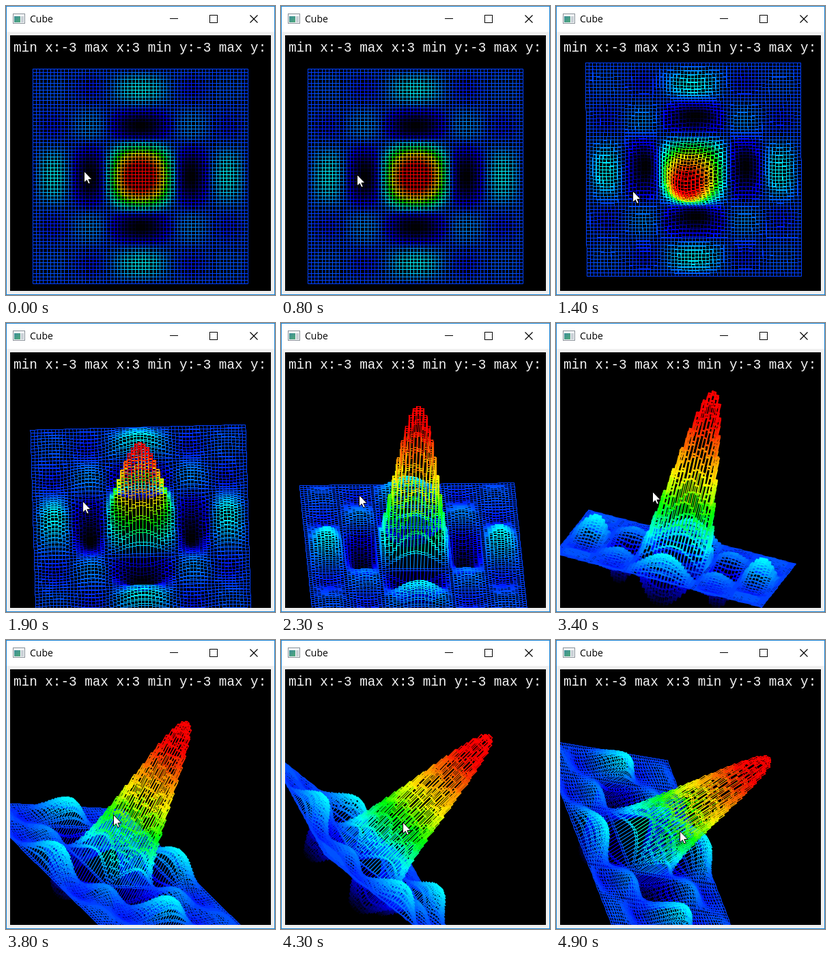
These frames come from a looping animation (394 px wide and 424 px high, 5 s). An HTML page with a canvas:

```html
<!DOCTYPE html>
<html lang="en">
<head>
<meta charset="utf-8">
<title>Cube</title>
<style>
  html, body { margin: 0; width: 100%; height: 100%; overflow: hidden; background: #f0f0f0; }
  .window { position: absolute; left: 0; top: 0; width: 394px; height: 424px; overflow: hidden; background: #f0f0f0; }
  .bar { position: absolute; left: 0; top: 0; width: 394px; height: 38px; background: #fff; }
  .border { position: absolute; inset: 0; border: 1px solid #1883d7; }
  .title { position: absolute; left: 35px; top: 9px; font: 14px/20px "Open Sans", "Noto Sans", sans-serif; color: #000; }
  svg { position: absolute; left: 0; top: 0; }
  canvas { position: absolute; left: 6px; top: 43px; background: #000; }
  .label { position: absolute; left: 11px; top: 51px; white-space: pre; color: #f4f4f4;
    font: 19.3px/22px "Liberation Mono", "DejaVu Sans Mono", monospace; }
</style>
</head>
<body>
<div class="window">
  <div class="bar"></div>
  <svg width="394" height="38">
    <defs>
      <linearGradient id="teal" x2="1" y2="1">
        <stop offset="0" stop-color="#3f8f9a"/><stop offset="1" stop-color="#4fa878"/>
      </linearGradient>
    </defs>
    <rect x="10.5" y="11.5" width="17" height="14" fill="#f4f6f8" stroke="#8a9299"/>
    <rect x="12" y="15" width="9" height="9" fill="url(#teal)"/>
    <rect x="22" y="15" width="4" height="9" fill="#c9d0d6"/>
    <g fill="none" stroke="#000">
      <path d="M240 18.5h12"/>
      <rect x="298.5" y="13.5" width="11" height="11"/>
      <path d="M357.5 13.5l11 11m0-11l-11 11" stroke-width="1.15"/>
    </g>
  </svg>
  <div class="title">Cube</div>
  <canvas id="view" width="382" height="375"></canvas>
  <div class="label">min x:-3 max x:3 min y:-3 max y:</div>
  <div class="border"></div>
</div>
<script>
const ctx = document.getElementById('view').getContext('2d');
const CELLS = 61, HALF = 157.5, CX = 197, CY = 250, ZMIN = -0.2172;
const BINS = 98;

const sinc = v => Math.abs(v) < 1e-9 ? 1 : Math.sin(Math.PI * v) / (Math.PI * v);
const dot = (a, b) => a[0] * b[0] + a[1] * b[1] + a[2] * b[2];
const cross = (a, b) => [a[1] * b[2] - a[2] * b[1], a[2] * b[0] - a[0] * b[2], a[0] * b[1] - a[1] * b[0]];
const unit = a => { const n = Math.hypot(...a); return a.map(v => v / n); };
const flip = m => [0, 1, 2].map(i => m.map(r => r[i]));
const mul = (a, b) => { const t = flip(b); return a.map(r => t.map(c => dot(r, c))); };

// Rotation built from its screen-right and screen-down rows
function pose(right, down) {
  const x = unit(right), k = dot(x, down);
  const y = unit(down.map((v, i) => v - k * x[i]));
  return [x, y, cross(x, y)];
}

function spin([x, y, z], a) {
  const c = Math.cos(a), s = Math.sin(a), d = 1 - c;
  return [
    [c + x * x * d, x * y * d - z * s, x * z * d + y * s],
    [y * x * d + z * s, c + y * y * d, y * z * d - x * s],
    [z * x * d - y * s, z * y * d + x * s, c + z * z * d]
  ];
}

function blend(a, b, f) {
  if (a === b || f === 0) return a;
  const m = mul(b, flip(a));
  const angle = Math.acos(Math.max(-1, Math.min(1, (m[0][0] + m[1][1] + m[2][2] - 1) / 2)));
  const axis = unit([m[2][1] - m[1][2], m[0][2] - m[2][0], m[1][0] - m[0][1]]);
  return mul(spin(axis, angle * f), a);
}

const flat = pose([1, 0, 0], [0, 1, 0]);
const dip = pose([0.999, 0.005, -0.047], [0, 0.995, 0.1]);
const lean = pose([0.999, 0.026, -0.005], [-0.025, 0.898, -0.44]);
const side = pose([0.997, 0.108, 0.046], [0.025, 0.171, -0.985]);
const turn = pose([0.159, 0.965, 0.222], [-0.203, 0.248, -0.952]);
const roll = pose([-0.662, -0.267, 0.695], [-0.529, -0.494, -0.685]);
const end = pose([-0.581, -0.33, 0.72], [-0.095, -0.863, -0.48]);

// Tick (100 ms), pose, pointer x and y
const keys = [
  [0, flat, 114, 242], [2, flat, 114, 242], [3, flat, 112, 242], [4, flat, 112, 242],
  [5, flat, 111, 242], [7, flat, 111, 242], [13, flat, 111, 270],
  [14, dip, 112, 271], [16, dip, 112, 271], [19, lean, 112, 261],
  [27, side, 115, 242], [28, side, 115, 242], [34, turn, 141, 247],
  [43, roll, 178, 267], [48, end, 181, 280]
];

// Rainbow from black at the lowest point to red at the top
const stops = [[0, 0, 0], [0, 0, 255], [0, 255, 255], [0, 255, 0],
  [255, 255, 0], [255, 128, 0], [255, 0, 0], [255, 0, 0]];
const colors = Array.from({ length: BINS }, (_, b) => {
  const p = (b + 0.5) / BINS * 7, i = Math.floor(p);
  return `rgb(${stops[i].map((v, j) => Math.round(v + (stops[i + 1][j] - v) * (p - i)))})`;
});

// Height 0..1 of each flat-topped cell
const level = Array.from({ length: CELLS }, (_, i) =>
  Array.from({ length: CELLS }, (_, j) =>
    (sinc(i / 10 - 3) * sinc(j / 10 - 3) - ZMIN) / (1 - ZMIN)));

function drawSurface(m) {
  const paths = colors.map(() => new Path2D());
  const at = (i, j, h) => {
    const p = [(2 * i / CELLS - 1) * HALF, (2 * j / CELLS - 1) * HALF, (2 * h - 1) * HALF];
    return [Math.floor(CX + dot(m[0], p) + 1e-6) + 0.5, Math.floor(CY + dot(m[1], p) + 1e-6) + 0.5];
  };
  const line = (h, ...points) => {
    const path = paths[Math.max(0, Math.min(BINS - 1, Math.floor(h * BINS)))];
    points.forEach((p, n) => n ? path.lineTo(...p) : path.moveTo(...p));
  };
  for (let i = 0; i <= CELLS; i++) {
    for (let j = 0; j <= CELLS; j++) {
      const h = level[i]?.[j];
      if (h !== undefined) {
        const a = at(i, j, h);
        line(h, a, at(i + 1, j, h), at(i + 1, j + 1, h), at(i, j + 1, h), a);
      }
      // Upright edges joining the cells that meet at this corner
      const meet = [h, level[i - 1]?.[j], level[i]?.[j - 1], level[i - 1]?.[j - 1]]
        .filter(v => v !== undefined).sort((p, q) => p - q);
      for (let n = 1; n < meet.length; n++) {
        line((meet[n - 1] + meet[n]) / 2, at(i, j, meet[n - 1]), at(i, j, meet[n]));
      }
    }
  }
  ctx.lineWidth = 1 + 0.4 * (1 - m[2][2]);
  ctx.lineCap = 'square';
  ctx.lineJoin = 'bevel';
  paths.forEach((p, b) => { ctx.strokeStyle = colors[b]; ctx.stroke(p); });
}

const arrow = new Path2D('M.5 .5V17L4.3 13.5L6.8 19L9.3 18L6.9 12.5H12Z');

function drawPointer(x, y) {
  ctx.save();
  ctx.translate(x, y);
  ctx.fillStyle = '#fff';
  ctx.fill(arrow);
  ctx.lineWidth = 1;
  ctx.lineCap = 'butt';
  ctx.lineJoin = 'miter';
  ctx.strokeStyle = '#000';
  ctx.stroke(arrow);
  ctx.restore();
}

function draw(tick) {
  const n = tick >= 46 ? tick - 1 : tick;
  const k = Math.max(1, keys.findIndex(key => key[0] >= n));
  const a = keys[k - 1], b = keys[k], f = (n - a[0]) / (b[0] - a[0]);
  const mix = i => Math.round(a[i] + (b[i] - a[i]) * f);
  ctx.setTransform(1, 0, 0, 1, -6, -43);
  ctx.fillStyle = '#000';
  ctx.fillRect(6, 43, 382, 375);
  drawSurface(blend(a[1], b[1], f));
  drawPointer(mix(2), mix(3));
}

const start = performance.now();
let shown = -1;
function loop() {
  const tick = Math.floor((performance.now() - start) % 5000 / 100);
  if (tick !== shown) draw(shown = tick);
  requestAnimationFrame(loop);
}
loop();
</script>
</body>
</html>
```
